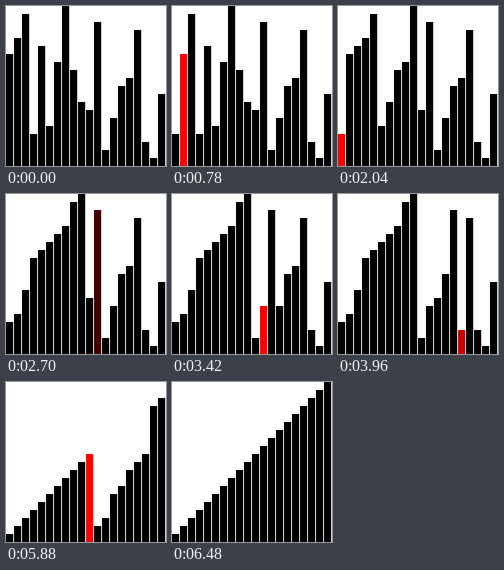
Recreate the animation shown at these times as a matplotlib script. Size 200x200 px, loop 8.48 s.

```python
import matplotlib.pyplot as plt
from matplotlib.animation import FuncAnimation

SIZE = 200
TICK = 20           # ms per drawn frame
STEP = 60           # ms per sorting step
LOOP = 8480
START = [14, 16, 19, 4, 15, 5, 13, 20, 12, 8,
         7, 18, 2, 6, 10, 11, 17, 3, 1, 9]
BAR = SIZE // len(START)


def merge_sort(a, lo, hi):
    """Yield (values, active index, size of the run) for each step."""
    size = hi - lo
    if size == 1:
        yield a[:], lo, size
        return
    mid = (lo + hi + 1) // 2
    yield from merge_sort(a, lo, mid)
    yield from merge_sort(a, mid, hi)
    left, right = a[lo:mid], a[mid:hi]
    for i in range(lo, hi):
        take_left = left and (not right or left[0] <= right[0])
        a[i] = (left if take_left else right).pop(0)
        yield a[:], i, size


def shade(size):
    # short runs glow darker than long ones
    return (min(255, 68 * size) / 255, 0, 0)


steps = list(merge_sort(START[:], 0, len(START)))
steps[0] = (START, None, 0)
steps.append((sorted(START), None, 0))

fig = plt.figure(figsize=(2, 2), dpi=100, facecolor="white")
ax = fig.add_axes([0, 0, 1, 1])
ax.set_xlim(0, SIZE)
ax.set_ylim(0, SIZE)
ax.axis("off")
bars = ax.bar([i * BAR for i in range(len(START))],
              [v * BAR for v in START], width=BAR - 1, align="edge",
              color="black", linewidth=0, antialiased=False)
ax.set_xlim(0, SIZE)
ax.set_ylim(0, SIZE)


def draw(frame):
    k = min(frame * TICK // STEP, len(steps) - 1)
    values, active, size = steps[k]
    for i, (bar, v) in enumerate(zip(bars, values)):
        bar.set_height(v * BAR)
        bar.set_facecolor(shade(size) if i == active else "black")
    return list(bars)


anim = FuncAnimation(fig, draw, frames=LOOP // TICK, interval=TICK,
                     init_func=lambda: draw(0), repeat=True,
                     repeat_delay=0, blit=False)
plt.show()
```
